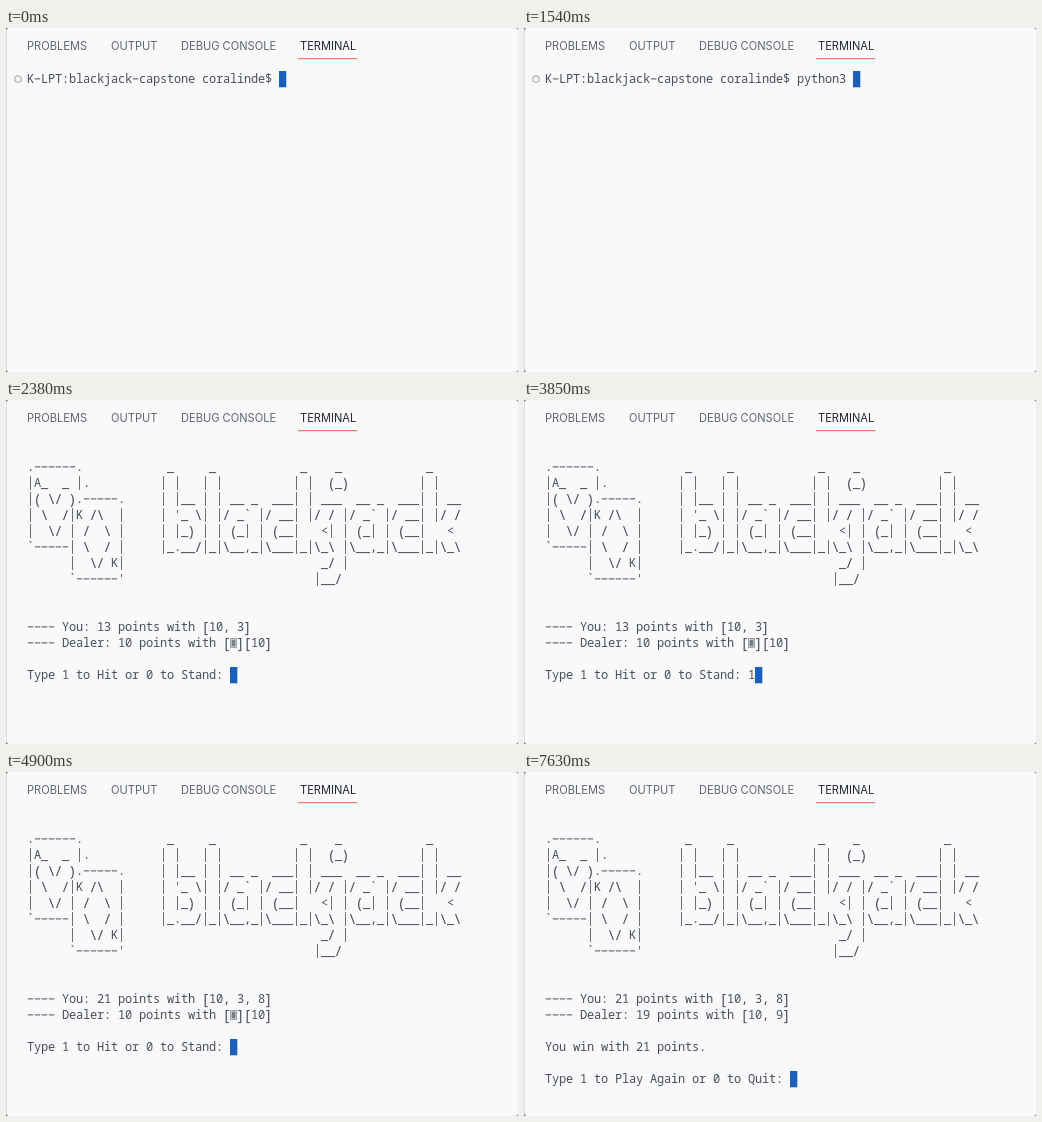
Animation, 512 px wide and 344 px high, one loop 8000 ms. Source, as an HTML page with a canvas:

```html
<!DOCTYPE html>
<html lang="en">
<head>
<meta charset="utf-8">
<title>Blackjack in the terminal</title>
<style>
  html, body { margin: 0; width: 100%; height: 100%; overflow: hidden; background: #f7f9fb; }
  canvas { display: block; width: 512px; height: 344px; }
</style>
</head>
<body>
<canvas id="stage"></canvas>
<script>
const W = 512, H = 344, LOOP = 8000;
const CELL = 7, LINE = 16, LEFT = 21, TOP = 43;
const INK = '#4b4f54', BLUE = '#1a5fb9';
const MONO = '12px "Noto Sans Mono", monospace';
const TALL = '14px "Noto Sans Mono", monospace';
const SANS = '11.1px Inter, sans-serif';

const canvas = document.getElementById('stage');
const ctx = canvas.getContext('2d');
const ratio = window.devicePixelRatio || 1;
canvas.width = W * ratio;
canvas.height = H * ratio;
ctx.scale(ratio, ratio);

const tabs = [['PROBLEMS', 21], ['OUTPUT', 105], ['DEBUG CONSOLE', 175], ['TERMINAL', 294]];

const logo = String.raw`
.------.            _     _            _    _            _
|A_  _ |.          | |   | |          | |  (_)          | |
|( \/ ).-----.     | |__ | | __ _  ___| | ___  __ _  ___| | __
| \  /|K /\  |     | '_ \| |/ _@ |/ __| |/ / |/ _@ |/ __| |/ /
|  \/ | /  \ |     | |_) | | (_| | (__|   <| | (_| | (__|   <
@-----| \  / |     |_.__/|_|\__,_|\___|_|\_\ |\__,_|\___|_|\_\
      |  \/ K|                            _/ |
      @------'                           |__/`.replaceAll('@', '`').split('\n');

const prompt = 'K-LPT:blackjack-capstone coralinde$ ';
const command = 'python3 blackjack.py ';
const ask = 'Type 1 to Hit or 0 to Stand: ';
const hidden = '---- Dealer: 10 points with [#][10]';
const firstHand = '---- You: 13 points with [10, 3]';
const lastHand = '---- You: 21 points with [10, 3, 8]';

// Times at which one more character of the command is on screen
const keys = [490, 700, 840, 980, 1120, 1260, 1400, 1540, 1680];

// The cursor stands at the end of the last line
const shell = t => {
  const typed = t >= 1960 ? command.length : keys.filter(k => t >= k).length;
  const lines = [prompt + command.slice(0, typed)];
  return t >= 2240 ? [...lines, ''] : lines;
};
const game = (...lines) => [...logo, '', ...lines];

function screen(t) {
  if (t < 2310) return shell(t);
  if (t < 2380) return game('');
  if (t < 4830) return game('', firstHand, hidden, '', ask + (t >= 3850 ? '1' : ''));
  if (t < 4900) return game('');
  if (t < 7630) return game('', lastHand, hidden, '', ask + (t >= 6370 ? '0' : ''));
  return game('', lastHand, '---- Dealer: 19 points with [10, 9]', '',
    'You win with 21 points.', '', 'Type 1 to Play Again or 0 to Quit: ');
}

function rect(x, y, w, h, color) {
  ctx.fillStyle = color;
  ctx.fillRect(x, y, w, h);
}

function drawPanel() {
  rect(0, 0, W, H, '#55585c');
  ctx.fillStyle = '#dcdee0';
  ctx.beginPath();
  ctx.roundRect(0, 0, W, H, 3);
  ctx.fill();
  ctx.fillStyle = '#f7f9fb';
  ctx.beginPath();
  ctx.roundRect(1, 0, W - 1, H, 3);
  ctx.fill();

  ctx.textAlign = 'left';
  ctx.font = SANS;
  for (const [name, x] of tabs) {
    ctx.fillStyle = name === 'TERMINAL' ? '#25282c' : '#63666b';
    ctx.fillText(name, x, 22);
  }
  rect(292, 30, 59.3, 1.2, '#f4796b');
}

function drawMarker() {
  ctx.strokeStyle = '#b4b7ba';
  ctx.lineWidth = 1.3;
  ctx.beginPath();
  ctx.arc(12, TOP + 8, 3.2, 0, Math.PI * 2);
  ctx.stroke();
}

function drawCardBack(x, y) {
  ctx.strokeStyle = '#a3a6a9';
  ctx.lineWidth = 1;
  ctx.strokeRect(x + 0.5, y + 3.5, 6, 9);
  rect(x + 1.5, y + 4.5, 4, 7, '#7b7e82');
}

function drawGlyph(ch, x, y) {
  if (ch === '#') return drawCardBack(x, y);
  // Tall bars and wide dashes, nearly joined to their neighbours
  if (ch === '|') return rect(x + 3, y + 1, 1, 14, '#6b6e72');
  if (ch === '-') return rect(x + 0.8, y + 7.4, 5.4, 1, INK);
  const tall = '/\\()[]'.includes(ch);
  ctx.font = tall ? TALL : MONO;
  ctx.fillStyle = INK;
  ctx.fillText(ch, x + CELL / 2, y + (tall ? 13 : 12));
}

function draw(t) {
  drawPanel();
  if (t < 2310) drawMarker();
  const lines = screen(t);
  ctx.textAlign = 'center';
  lines.forEach((line, row) => {
    [...line].forEach((ch, col) => drawGlyph(ch, LEFT + col * CELL, TOP + row * LINE));
  });
  const last = lines.length - 1;
  rect(LEFT + lines[last].length * CELL, TOP + last * LINE, CELL + 0.3, LINE + 0.3, BLUE);
}

const start = performance.now();
function tick() {
  draw((performance.now() - start) % LOOP);
  requestAnimationFrame(tick);
}
tick();
</script>
</body>
</html>
```
